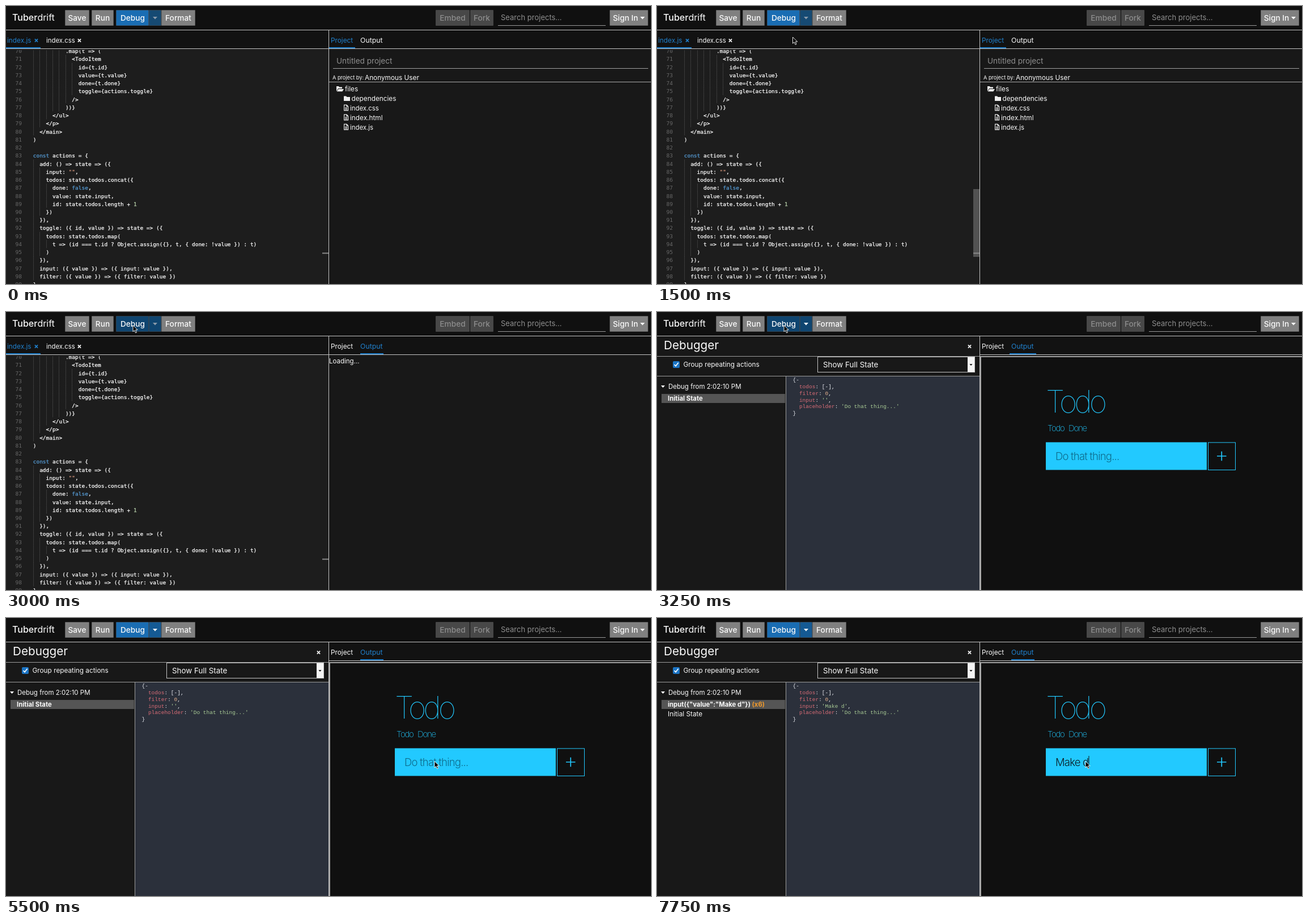
These frames come from a looping animation (1138 by 492 pixels, 8000 ms). An HTML page:

```html
<!DOCTYPE html>
<html lang="en">
<head>
<meta charset="utf-8">
<title>Code playground</title>
<style>
html, body { margin: 0; width: 100%; height: 100%; overflow: hidden; background: #121212 }
svg { display: block; width: 1138px; height: 492px }
text { font: 11.8px Inter, "Open Sans", sans-serif; fill: #fafafa; white-space: pre }
.btn text { font-size: 13.7px; font-weight: 500; text-anchor: middle }
.btn rect { stroke: #fff; stroke-opacity: .12 }
.off text { fill: #8d8d8d }
.hint { font-size: 13.6px; fill: #8f8f8f }
.on text, text.on { fill: #2080cd }
.code text { font: 9.5px "DejaVu Sans Mono", monospace; fill: #fff; stroke: #fff; stroke-width: .25px }
.code .num { fill: #686868; stroke: none; text-anchor: end }
.code .key { fill: #569cd6; stroke: #569cd6 }
.code .str { fill: #ce9178; stroke: #ce9178 }
.code .one { fill: #b5cea8; stroke: #b5cea8 }
.guide { stroke: #585858; stroke-dasharray: 1 1 }
.tree text { font: 9.5px "Liberation Mono", monospace; fill: #e4e7ec }
.prop { fill: #d96c76 } .val { fill: #a9cb95 } .count { fill: #f0992b }
.rule { fill: none; stroke: #c4c4c4 }
.app text { fill: #22c9ff; font-weight: 200; letter-spacing: -1.3px }
.app .field { font-size: 18.5px; font-weight: 300; letter-spacing: -.8px }
</style>
</head>
<body>
<svg viewBox="0 0 1138 492">
  <defs>
    <path id="close" d="M-2.6-2.6 2.6 2.6M2.6-2.6-2.6 2.6" stroke-width="1.7"/>
    <path id="down" d="M-4-2H4L0 2.5z"/>
    <g id="file">
      <path d="M.6.6H5L7.6 3.2V10.4H.6zM5 .6V3.2H7.6M2.2 5.2H6M2.2 7H6M2.2 8.7H6" fill="none" stroke="#eee" stroke-width="1.1"/>
    </g>
  </defs>

  <!-- toolbar -->
  <rect width="1138" height="42" fill="#101010"/>
  <text x="11" y="26" style="font-size:16px"><tspan font-weight="500">Tuber</tspan><tspan font-weight="400">drift</tspan></text>
  <g id="buttons" class="btn"></g>
  <use id="menu" href="#down" x="263" y="21"/>
  <use href="#down" x="1123" y="21" fill="#fff"/>
  <text class="hint" x="873" y="25" style="font-size:13px">Search projects...</text>
  <path class="rule" d="M868 34.5H1058" style="stroke:#9a9a9a"/>

  <!-- editor -->
  <g id="editor">
    <rect y="76" width="569" height="416" fill="#1d1d1d"/>
    <g id="code" class="code"></g>
    <rect id="thumb" x="558" y="324" width="11" height="120" fill="#797979" fill-opacity=".58"/>
    <rect x="558" y="436.5" width="11" height="2" fill="#8a8a8a"/>
    <rect y="43" width="569" height="33" fill="#121212"/>
    <rect y="76" width="569" height="2" fill="#1d1d1d"/>
    <g class="on"><text x="2" y="64.5">index.js</text><use href="#close" x="53.5" y="61" stroke="#2080cd"/></g>
    <text x="71" y="64.5" style="font-size:11.4px">index.css</text>
    <use href="#close" x="129.5" y="61" stroke="#fff"/>
    <path class="rule" d="M0 75.5H569"/>
    <path d="M0 74H61" stroke="#2080cd" stroke-width="2"/>
  </g>

  <!-- debugger -->
  <g id="debugger">
    <rect y="43" width="569" height="449" fill="#181818"/>
    <text x="12" y="65.5" style="font-size:20.7px">Debugger</text>
    <use href="#close" x="551.5" y="61" stroke="#fff"/>
    <rect x="28" y="87" width="12" height="12" rx="2" fill="#1b74c4"/>
    <path d="M30.5 93 33 95.7 37.6 89.8" fill="none" stroke="#fff" stroke-width="1.7"/>
    <text x="46.5" y="97">Group repeating actions</text>
    <rect class="rule" x="283.5" y="79.5" width="277" height="27"/>
    <rect x="548" y="80" width="12" height="26" fill="#f4f4f4"/>
    <path d="M551.5 92h5l-2.5 3z" fill="#111"/>
    <text x="293" y="98" style="font-size:13.4px">Show Full State</text>
    <path d="M7 130h7l-3.5 4z" fill="#fff"/>
    <text x="20" y="136" style="font-size:11.5px">Debug from 2:02:10 PM</text>
    <rect x="8" y="145" width="218" height="16" fill="#555"/>
    <text id="action" x="19" y="157" style="font-size:11.3px;font-weight:700"></text>
    <text id="initial" x="19" y="174">Initial State</text>
    <rect x="227" y="113" width="342" height="379" fill="#2b303b"/>
    <path class="rule" d="M0 78.5H569M0 113.5H569M227.5 113V492" style="stroke:#9c9c9c"/>
    <g id="tree" class="tree"></g>
  </g>

  <!-- right side -->
  <rect x="570" y="43" width="568" height="33" fill="#121212"/>
  <rect x="570" y="76" width="568" height="416" fill="#181818"/>
  <text id="projectTab" x="573" y="64.5">Project</text>
  <text id="outputTab" x="625" y="64.5" style="font-size:12.3px">Output</text>
  <g id="project">
    <text class="hint" x="583" y="101.5">Untitled project</text>
    <path class="rule" d="M577 110.5H1133" style="stroke:#a0a0a0"/>
    <text x="576" y="130" style="font-size:9.2px">A project by:</text>
    <text x="633" y="130.5">Anonymous User</text>
    <path class="rule" d="M570 134.5H1138" style="stroke:#aaa"/>
    <path d="M583 151V142h4l1 1.4h5V146h-7zM586.4 147H596l-2.6 4.2h-9.6z" fill="#eee"/>
    <path d="M596 168v-8.6h4.2l1.2 1.5h5.6V168z" fill="#eee"/>
    <text x="598" y="151">files</text>
    <text x="609.5" y="167.5">dependencies</text>
    <use href="#file" x="596" y="174.5"/><text x="607" y="184.5" style="font-size:11.4px">index.css</text>
    <use href="#file" x="596" y="191.5"/><text x="607" y="201.5">index.html</text>
    <use href="#file" x="596" y="208.5"/><text x="607" y="218.5" style="font-size:11.4px">index.js</text>
  </g>
  <text id="loading" x="570" y="91" style="font-size:11.5px">Loading...</text>
  <g id="app" class="app">
    <rect x="571" y="79" width="570" height="420" fill="#101010" stroke="#a0a0a0" stroke-width="2"/>
    <text x="686" y="178" style="font-size:54px;font-weight:100;letter-spacing:-5px">Todo</text>
    <text x="689" y="211" style="font-size:15px">Todo</text>
    <text x="726" y="211" style="font-size:15px">Done</text>
    <rect x="686" y="230.5" width="284" height="49" fill="#22c9ff"/>
    <text id="field" class="field" x="703" y="262"></text>
    <rect id="caret" y="244" width="1" height="23" fill="#111"/>
    <rect x="972.5" y="231" width="48" height="48.5" fill="none" stroke="#22c9ff"/>
    <path d="M988 255H1004.5M996.25 246.8V263.2" stroke="#22c9ff" stroke-width="1.7"/>
  </g>
  <path class="rule" d="M0 42.5H1138M570 75.5H1138M569.5 43V492"/>
  <path id="underline" stroke="#2080cd" stroke-width="2"/>

  <path id="cursor" d="M0 0V11.3L2.6 8.9 4.6 13.4 6.5 12.6 4.6 8.2H8.2z" fill="#000" stroke="#fff" stroke-width=".9"/>
</svg>
<script>
const $ = id => document.getElementById(id);
const show = (id, visible) => { $(id).style.display = visible ? '' : 'none'; };
const escape = s => s.replace(/&/g, '&amp;').replace(/</g, '&lt;');

const button = (label, x, right, fill, cx = (x + right) / 2, cls = '') =>
  `<g class="${cls}"><rect x="${x + .5}" y="7.5" width="${right - x - 1}" height="27" fill="${fill}"/>` +
  `<text x="${cx}" y="25.5">${label}</text></g>`;
$('buttons').innerHTML =
  button('Save', 104, 147, '#808080') + button('Run', 151, 190, '#808080') +
  button('Debug', 194, 252, '#1a6db3', 223.5) + button('', 252, 274, '#155a94') +
  button('Format', 274, 334, '#808080') +
  button('Embed', 758, 818, '#484848', 788, 'off') +
  button('Fork', 819, 860, '#484848', 839.5, 'off') +
  button('Sign In', 1065, 1133, '#808080', 1093);
const [debugButton, menuButton] = [2, 3].map(i => $('buttons').children[i].firstChild);

const source = `          .map(t => (
            <TodoItem
              id={t.id}
              value={t.value}
              done={t.done}
              toggle={actions.toggle}
            />
          ))}
      </ul>
    </p>
  </main>
)

const actions = {
  add: () => state => ({
    input: "",
    todos: state.todos.concat({
      done: false,
      value: state.input,
      id: state.todos.length + 1
    })
  }),
  toggle: ({ id, value }) => state => ({
    todos: state.todos.map(
      t => (id === t.id ? Object.assign({}, t, { done: !value }) : t)
    )
  }),
  input: ({ value }) => ({ input: value }),
  filter: ({ value }) => ({ filter: value })
}`;
const tint = word => {
  const cls = word === '""' ? 'str' : word === '1' ? 'one' : 'key';
  return `<tspan class="${cls}">${word}</tspan>`;
};
$('code').innerHTML = source.split('\n').map((line, i) => {
  const y = 83.2 + i * 14.24;
  const indent = line.search(/\S|$/);
  let guides = '';
  for (let col = 0; col < indent; col += 2) {
    const x = Math.round(47.7 + col * 5.72) + .5;
    guides += `M${x} ${y - 10.5}v14.24`;
  }
  return `<path class="guide" d="${guides}"/><text class="num" x="28" y="${y}">${70 + i}</text>` +
    `<text x="47.7" y="${y}">${escape(line).replace(/const|false|""|1$/g, tint)}</text>`;
}).join('');

function drawState(input) {
  const prop = (name, value) => `  <tspan class="prop">${name}</tspan>: ${value},`;
  const str = s => `<tspan class="val">'${s}'</tspan>`;
  $('tree').innerHTML = [
    '{-', prop('todos', '[-]'), prop('filter', '<tspan fill="#e5b18e">0</tspan>'),
    prop('input', str(input)), prop('placeholder', str('Do that thing...')).slice(0, -1), '}'
  ].map((row, i) => `<text x="239.5" y="${122.8 + i * 11.9}">${row}</text>`).join('');
}

// Pointer stops: time, x, y
const stops = [
  [500, 700, 330], [750, 540, 375], [1000, 410, 335], [1250, 320, 200], [1500, 239.5, 55],
  [1750, 232, 38], [2000, 224, 23.5], [3750, 400, 110], [4000, 573.5, 199.5],
  [4250, 680, 232], [4500, 742, 255], [4750, 756, 253.5]
];
// Typing: time, text
const typing = [[0, ''], [6000, 'Ma'], [6250, 'Mak'], [6500, 'Make'], [7500, 'Make '], [7750, 'Make d']];
const latest = (list, t) => list.filter(item => item[0] <= t).pop();
const within = (t, from, to) => t >= from && t < to;

function draw(t) {
  const started = t >= 3000, debugging = t >= 3250;
  const hover = within(t, 2000, 3750);

  const stop = latest(stops, t);
  show('cursor', stop);
  if (stop) $('cursor').setAttribute('transform', `translate(${stop[1]} ${stop[2]})`);

  debugButton.setAttribute('fill', hover ? '#0f4570' : '#1a6db3');
  menuButton.setAttribute('fill', hover ? '#0f4570' : debugging ? '#155a94' : '#164a73');
  $('menu').setAttribute('fill', debugging ? '#fff' : '#8b9bab');
  $('thumb').style.opacity = within(t, 750, 2500) ? Math.min(1, (2500 - t) / 750) : 0;

  show('editor', !debugging);
  show('debugger', debugging);
  show('project', !started);
  show('loading', started && !debugging);
  show('app', debugging);
  $('projectTab').classList.toggle('on', !started);
  $('outputTab').classList.toggle('on', started);
  $('underline').setAttribute('d',
    !started ? 'M570 74H616' : within(t, 3250, 3750) ? 'M622 74H669' : 'M625 74H666');

  const typed = latest(typing, t)[1];
  $('field').textContent = typed || 'Do that thing...';
  $('field').style.fill = typed ? '#0b1c24' : '#0e6c8c';
  $('action').innerHTML = typed
    ? `input({"value":"${typed}"}) <tspan class="count">(x${typed.length})</tspan>` : 'Initial State';
  show('initial', typed);
  drawState(typed);

  const caretOn = within(t, 4750, 5500) || within(t, 6000, 6500) || t >= 7000;
  show('caret', caretOn);
  if (caretOn && debugging)
    $('caret').setAttribute('x', 703 + (typed ? $('field').getComputedTextLength() : 0));
}

let shown = -1;
function tick() {
  const step = Math.floor(performance.now() % 8000 / 250) * 250;
  if (step !== shown) draw(shown = step);
  requestAnimationFrame(tick);
}
tick();
</script>
</body>
</html>
```
